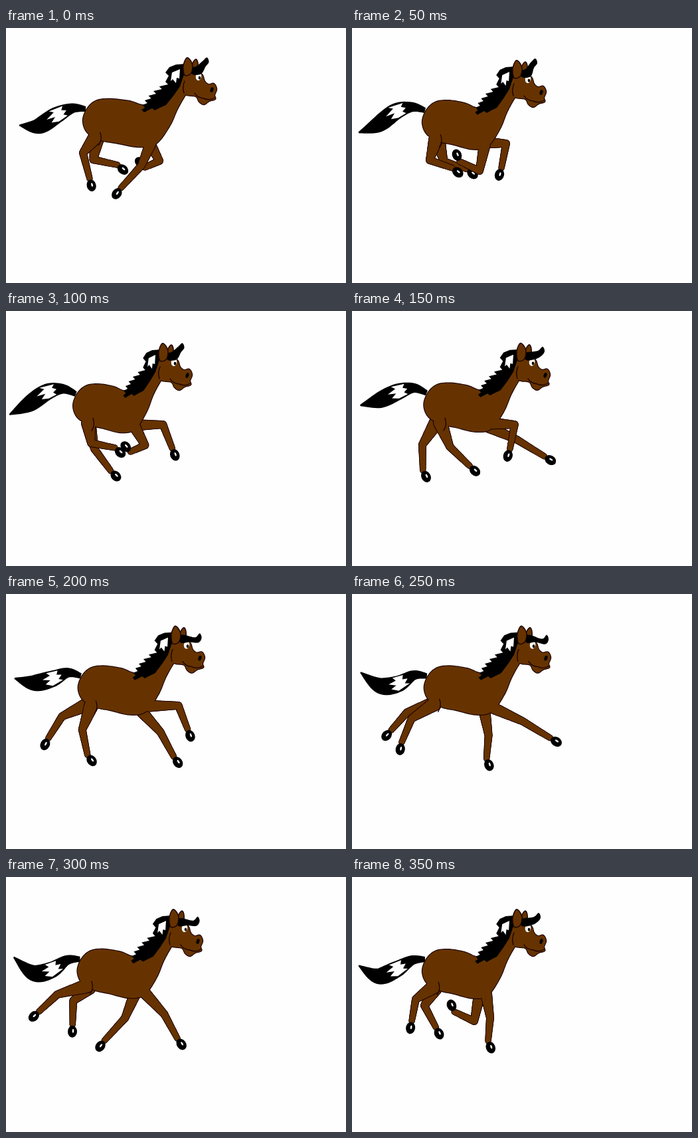
Animation of 512 by 384 pixels, one loop 0.4 s. Source, as an HTML page with a canvas:

```html
<!DOCTYPE html>
<html lang="en">
<head>
<meta charset="utf-8">
<title>Galloping horse</title>
<style>
  html, body { margin: 0; width: 100%; height: 100%; overflow: hidden; background: #fefefe; }
  canvas { display: block; }
</style>
</head>
<body>
<canvas id="stage" width="512" height="384"></canvas>
<script>
const ctx = document.getElementById('stage').getContext('2d');
const BROWN = '#663300', DARK = '#1c0400', BLACK = '#000', WHITE = '#fefefe';
const STEP = 50, STEPS = 8;

const pairs = list => list.flatMap((v, i) => i % 2 ? [] : [[v, list[i + 1]]]);
const add = ([ax, ay], [bx, by]) => [ax + bx, ay + by];
const lerp = (a, b, t) => a.map((v, i) => v + (b[i] - v) * t);
const wave = (step, peak) => Math.cos((step - peak) * 2 * Math.PI / STEPS);
const bump = (step, peak) => Math.max(0, wave(step, peak)) ** 4;

// How far the head lags at each step; the rest of the body follows in part
const LAG = [0, 25, 37, 19, 18, 18, 21, 25];
const shift = (step, share) => [-LAG[step] * share, Math.min(4, LAG[step] * share * .2)];
const RUMP = .4, WITHERS = .8, HEAD = 1;

// One stride of a leg: closed paths of knee and fetlock around the resting body
const FORE = {
  share: WITHERS, hip: [221, 166], radii: [8, 5, 3.7], flick: 1.4, plant: 7, lead: 2, farShift: [-8, 2],
  knee: pairs([204, 207, 212, 211, 239, 198, 260, 168, 274, 165, 272, 189, 255, 203, 228, 208]),
  fetlock: pairs([173, 241, 182, 197, 217, 208, 253, 205, 288, 201, 313, 214, 275, 240, 225, 243])
};
const HIND = {
  share: RUMP, hip: [138, 160], radii: [10, 5, 3.7], flick: .6, plant: 4.2, lead: 1.3, farShift: [0, 1],
  knee: pairs([116, 188, 127, 197, 143, 196, 155, 203, 122, 203, 97, 186, 86, 175, 106, 182]),
  fetlock: pairs([126, 227, 161, 209, 179, 203, 185, 232, 130, 241, 82, 222, 58, 201, 100, 215])
};

// Resting shapes
const TORSO = [122, 122, 135, 110, 155, 107, 185, 110, 212, 116, 240, 96, 262, 72, 282, 84, 270, 101,
  258, 122, 246, 148, 226, 174, 200, 179, 165, 173, 143, 169, 123, 158, 116, 140];
const FACE = [264, 72, 273, 66, 284, 66, 295, 70, 299, 80, 305, 85, 313, 84, 317, 92, 314, 101, 315, 107,
  306, 110, 298, 115, 291, 111, 286, 103, 273, 101, 264, 95];
const BLAZE = [250, 67, 262, 62, 261, 76, 257, 75, 256, 83, 251, 77, 248, 80];
const NEAR_EAR = [269, 71, 267, 57, 272, 45, 278, 49, 281, 58, 278, 69];
const FAR_EAR = [279, 64, 281, 53, 286, 47, 289, 53, 288, 64];

// Mane: a tuft behind the ear, then teeth running down the crest
const MANE = [270, 54, 256, 55, 246, 59, 240, 67, 245, 72];
for (let t = 0; t <= 1; t += 1 / 6) {
  const x = 240 - 36 * Math.sin(t * Math.PI / 2), y = 81 + 42 * t;
  MANE.push(x, y, x + 4, y + 4);
}
MANE.push(220, 121, 224, 124, 232, 120, 241, 116, 253, 101, 262, 88, 268, 70);

const TAIL = [
  { x: 0, y: 0, sway: 0, peak: 0, width: 4 },
  { x: -20, y: -3, sway: 5, peak: 6.5, width: 7.5 },
  { x: -44, y: 7, sway: 10, peak: 6.3, width: 12.5 },
  { x: -71, y: 18, sway: 8, peak: 7.6, width: 12 },
  { x: -100, y: 14, sway: 20, peak: 9.3, width: 1 }
];
const TAIL_BAND = [1.45, -.8, 1.65, -.35, 1.4, 0, 1.65, .3, 1.5, .8, 2.2, .85, 2.05, .45,
  2.5, .2, 2.1, -.1, 2.4, -.4, 2.05, -.8];

// Catmull-Rom through the vectors given by at(index)
function spline(at, u) {
  const i = Math.floor(u), t = u - i;
  const [a, b, c, d] = [-1, 0, 1, 2].map(k => at(i + k));
  return b.map((v, n) => v + t * (c[n] - a[n] + t * (2 * a[n] - 5 * v + 4 * c[n] - d[n]
    + t * (3 * (v - c[n]) + d[n] - a[n]))) / 2);
}
const closed = points => i => points[(i + points.length) % points.length];
const open = points => i => points[Math.max(0, Math.min(points.length - 1, i))];

function polygon(points) {
  const path = new Path2D();
  points.forEach(p => path.lineTo(...p));
  path.closePath();
  return path;
}

function smooth(points) {
  const outline = [];
  for (let u = 0; u < points.length; u += 1 / 8) outline.push(spline(closed(points), u));
  return polygon(outline);
}

function fill(path, color) {
  ctx.fillStyle = color;
  ctx.fill(path);
}

function stroke(path, width = 1.5) {
  ctx.strokeStyle = DARK;
  ctx.lineWidth = width;
  ctx.stroke(path);
}

function ellipse([x, y], rx, ry, color, angle = 0) {
  ctx.beginPath();
  ctx.ellipse(x, y, rx, ry, angle, 0, 2 * Math.PI);
  ctx.fillStyle = color;
  ctx.fill();
}

function poseLeg(leg, step, far) {
  const u = (step + (far ? leg.lead : 0)) % STEPS;
  const body = add(shift(step, leg.share), far ? leg.farShift : [0, 0]);
  const knee = add(spline(closed(leg.knee), u), body);
  const fetlock = add(spline(closed(leg.fetlock), u), body);
  const hip = lerp(add(leg.hip, body), knee, .15);
  const shank = Math.atan2(fetlock[1] - knee[1], fetlock[0] - knee[0]);
  const angle = shank + leg.flick * bump(u, 1.7) - .45 * bump(u, leg.plant);
  return { joints: [hip, knee, fetlock], radii: leg.radii, angle };
}

// Tapered limb from hip to fetlock
function limb({ joints, radii }, grow, color) {
  for (let i = 0; i < 2; i++) {
    for (let t = 0; t <= 1; t += 1 / 32) {
      const r = radii[i] + (radii[i + 1] - radii[i]) * t + grow;
      ellipse(lerp(joints[i], joints[i + 1], t), r, r, color);
    }
  }
}

function hoof({ joints, angle }) {
  const center = add(joints[2], [10.5 * Math.cos(angle), 10.5 * Math.sin(angle)]);
  ellipse(center, 9, 7, BLACK, angle);
  ellipse(add(center, [1, -1]), 3, 1.3, WHITE, angle);
}

function drawTail(step) {
  const root = add([120, 122], shift(step, RUMP));
  const spine = open(TAIL.map(p =>
    [...add(root, [p.x, p.y + p.sway * wave(step, p.peak)]), p.width]));
  const place = ([u, side]) => {
    const [x, y, width] = spline(spine, u);
    const [x0, y0] = spline(spine, Math.max(0, u - .05)), [x1, y1] = spline(spine, Math.min(4, u + .05));
    const k = side * width / Math.hypot(x1 - x0, y1 - y0);
    return [x - (y1 - y0) * k, y + (x1 - x0) * k];
  };
  const us = Array.from({ length: 41 }, (_, i) => i / 10);
  const edge = [...us.map(u => [u, 1]), ...us.reverse().map(u => [u, -1])];
  fill(polygon(edge.map(place)), BLACK);
  fill(polygon(pairs(TAIL_BAND).map(place)), WHITE);
}

function drawHead(step, shape) {
  fill(shape(MANE, polygon), BLACK);
  fill(shape(BLAZE, polygon), WHITE);

  ctx.save();
  ctx.translate(...shift(step, HEAD));
  ellipse([290, 73], 4.2, 6, WHITE, .15);
  ellipse([291.5, 75], 1.8, 2.6, BLACK);
  ellipse([310, 93], 2.4, 4, BLACK, .3);
  stroke(new Path2D('M284 98Q288 105 298 106Q307 110 314 105M269 80Q265 89 268 98'), 1.4);
  ctx.restore();

  // The forelock tip flops down once per stride
  const flop = wave(step, 5), x = 306 + 5 * flop, y = 50 + 8 * flop;
  fill(shape([277, 60, 286, 58, x - 7, y + 6, x, y, x + 3, y + 7, x - 2, y + 14, 294, 69, 281, 70]), BLACK);
  const ear = shape(NEAR_EAR);
  fill(ear, BROWN);
  stroke(ear);
}

function draw(step) {
  // The shift blends from rump through withers to head
  const warp = ([x, y]) => {
    const share = x < 212
      ? RUMP + (WITHERS - RUMP) * Math.max(0, (x - 150) / 62)
      : WITHERS + (HEAD - WITHERS) * Math.min(1, (x - 212) / 50);
    return add([x, y], shift(step, share));
  };
  const shape = (list, build = smooth) => build(pairs(list).map(warp));

  ctx.fillStyle = WHITE;
  ctx.fillRect(0, 0, 512, 384);
  ctx.lineJoin = ctx.lineCap = 'round';

  drawTail(step);
  for (const leg of [HIND, FORE]) {
    const pose = poseLeg(leg, step, true);
    limb(pose, 1, DARK);
    limb(pose, 0, BROWN);
    hoof(pose);
  }
  const farEar = shape(FAR_EAR);
  fill(farEar, BROWN);
  stroke(farEar);

  // Outlines first, so torso, head and near legs merge into one silhouette
  const solids = [shape(TORSO), shape(FACE)];
  const near = [HIND, FORE].map(leg => poseLeg(leg, step, false));
  solids.forEach(path => stroke(path, 2.4));
  near.forEach(pose => limb(pose, 1, DARK));
  solids.forEach(path => fill(path, BROWN));
  near.forEach(pose => limb(pose, 0, BROWN));
  near.forEach(hoof);

  const [hx, hy] = near[0].joints[0];
  const thigh = new Path2D();
  thigh.moveTo(hx + 7, hy - 7);
  thigh.quadraticCurveTo(hx + 11, hy + 3, hx + 5, hy + 12);
  stroke(thigh, 1.3);

  drawHead(step, shape);
}

function tick() {
  draw(Math.floor(performance.now() / STEP) % STEPS);
  requestAnimationFrame(tick);
}
tick();
</script>
</body>
</html>
```
